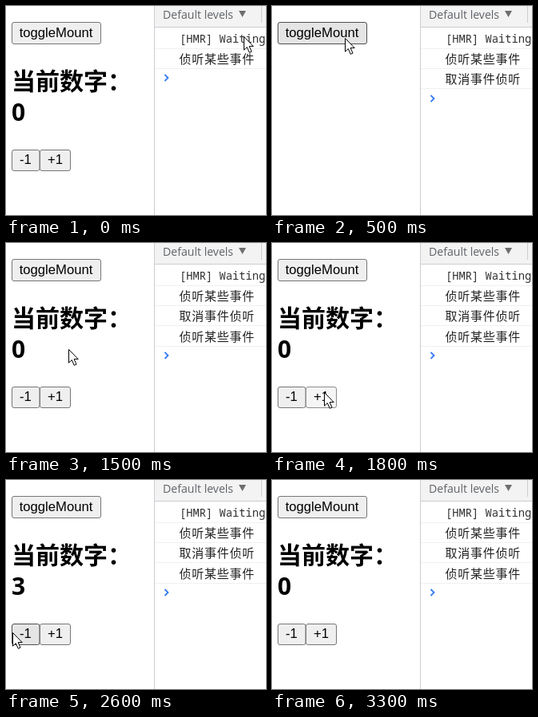
Write an HTML page that moves like this. It is 325 by 262 pixels and loops after 3600 ms.

```html
<!DOCTYPE html>
<html lang="zh-CN">
<head>
<meta charset="utf-8">
<title>Mount and unmount</title>
<style>
  html, body { margin: 0; width: 100%; height: 100%; overflow: hidden; background: #fff; }
  svg { display: block; width: 325px; height: 262px; }
  text { white-space: pre; }
  .button text { font: 16.67px "Liberation Sans", Arial, sans-serif; }
  .button rect { fill: #efefef; stroke: #767676; }
  .hover rect { fill: #e5e5e5; stroke: #4f4f4f; }
  .active rect { fill: #f5f5f5; stroke: #8d8d8d; }
  .title { font: bold 30px "Noto Sans CJK SC", sans-serif; }
  .count { font: bold 30px "Open Sans", "Noto Sans", sans-serif; }
  .levels { font: 14.1px "Open Sans", "Noto Sans", sans-serif; fill: #5f6368; }
  .mono { font: 13.75px "Noto Sans Mono", monospace; fill: #303030; }
  .log { font: 15px "Noto Sans CJK SC", sans-serif; letter-spacing: .75px; fill: #222; }
  .rule { stroke: #f0f0f0; }
  .edge { stroke: #cacdd1; }
</style>
</head>
<body>
<svg viewBox="0 0 325 262">
  <g id="toggle" class="button">
    <rect x="7.5" y="20.5" width="111" height="27" rx="2.5"/>
    <text x="16.7" y="39">toggleMount</text>
  </g>
  <g id="counter">
    <text class="title" x="7" y="105">当前数字：</text>
    <text class="count" id="count" x="7" y="144">0</text>
    <g id="minus" class="button">
      <rect x="7.5" y="180.5" width="34.5" height="26" rx="2.5"/>
      <text x="17" y="198">-1</text>
    </g>
    <g id="plus" class="button">
      <rect x="42.5" y="180.5" width="38" height="26" rx="2.5"/>
      <text x="52" y="198">+1</text>
    </g>
  </g>

  <rect x="186" width="139" height="26" fill="#f3f3f3"/>
  <path class="edge" d="M185.5 0V262M186 26.5H325M319.5 0V21"/>
  <text class="levels" x="196" y="16">Default levels</text>
  <path d="M291 6h9l-4.5 8z" fill="#6e6e6e"/>
  <text class="mono" x="217" y="46">[HMR] Waiting</text>
  <path class="rule" d="M186 53.5H325"/>
  <g id="logs"></g>
  <path id="prompt" d="M198.5 -4l4 4l-4 4" fill="none" stroke="#367cf1" stroke-width="1.8"/>

  <path id="cursor" d="M.5 .5V17.2L4.3 13.6L7.2 20.3L10 19.1L7.1 12.6H12.2Z"
        fill="#fff" stroke="#000" stroke-linejoin="round"/>
</svg>
<script>
const LOOP = 3600;
const messages = ['侦听某些事件', '取消事件侦听', '侦听某些事件'];
const $ = id => document.getElementById(id);

const start = {
  cursor: [297, 38], toggle: '', minus: '', plus: '',
  mounted: true, count: 0, logs: 1
};

// Each entry changes part of the state at its time in ms.
const steps = [
  [100, { cursor: [154, 41] }],
  [200, { cursor: [91, 40], toggle: 'hover' }],
  [300, { toggle: 'active' }],
  [500, { toggle: 'hover', mounted: false, logs: 2 }],
  [1100, { mounted: true }],
  [1200, { logs: 3 }],
  [1400, { cursor: [90, 46] }],
  [1500, { cursor: [78, 133], toggle: '' }],
  [1600, { cursor: [67, 178] }],
  [1700, { cursor: [65, 187], plus: 'hover' }],
  [1800, { plus: 'active' }],
  [1900, { plus: 'hover', count: 1 }],
  [2000, { plus: 'active' }],
  [2100, { count: 2 }],
  [2200, { plus: 'hover' }],
  [2300, { plus: 'active' }],
  [2400, { plus: 'hover', count: 3 }],
  [2500, { cursor: [20, 191], plus: '', minus: 'hover' }],
  [2600, { cursor: [8, 191] }],
  [2700, { minus: 'active' }],
  [2800, { minus: 'hover', count: 2 }],
  [2900, { minus: 'active', count: 1 }],
  [3000, { minus: 'hover', count: 0 }],
  [3100, { cursor: [87, 166], minus: '' }],
  [3200, { cursor: [269, 81] }],
  [3300, { cursor: null }]
];

$('logs').innerHTML = messages.map((text, i) => {
  const y = Math.round(72 + i * 25.3);
  return `<g><text class="log" x="216.5" y="${y}">${text}</text>
    <path class="rule" d="M186 ${y + 6.5}H325"/></g>`;
}).join('');

const show = (el, on) => el.style.display = on ? '' : 'none';

function draw(now) {
  const t = now % LOOP;
  const state = { ...start };
  for (const [time, change] of steps) if (t >= time) Object.assign(state, change);

  for (const id of ['toggle', 'minus', 'plus'])
    $(id).setAttribute('class', 'button ' + state[id]);
  show($('counter'), state.mounted);
  $('count').textContent = state.count;
  [...$('logs').children].forEach((el, i) => show(el, i < state.logs));
  $('prompt').setAttribute('transform', `translate(0 ${Math.round(65 + state.logs * 25.4)})`);
  show($('cursor'), state.cursor);
  if (state.cursor) $('cursor').setAttribute('transform', `translate(${state.cursor})`);
}

const begin = performance.now();
function tick() {
  draw(performance.now() - begin);
  requestAnimationFrame(tick);
}
tick();
</script>
</body>
</html>
```
